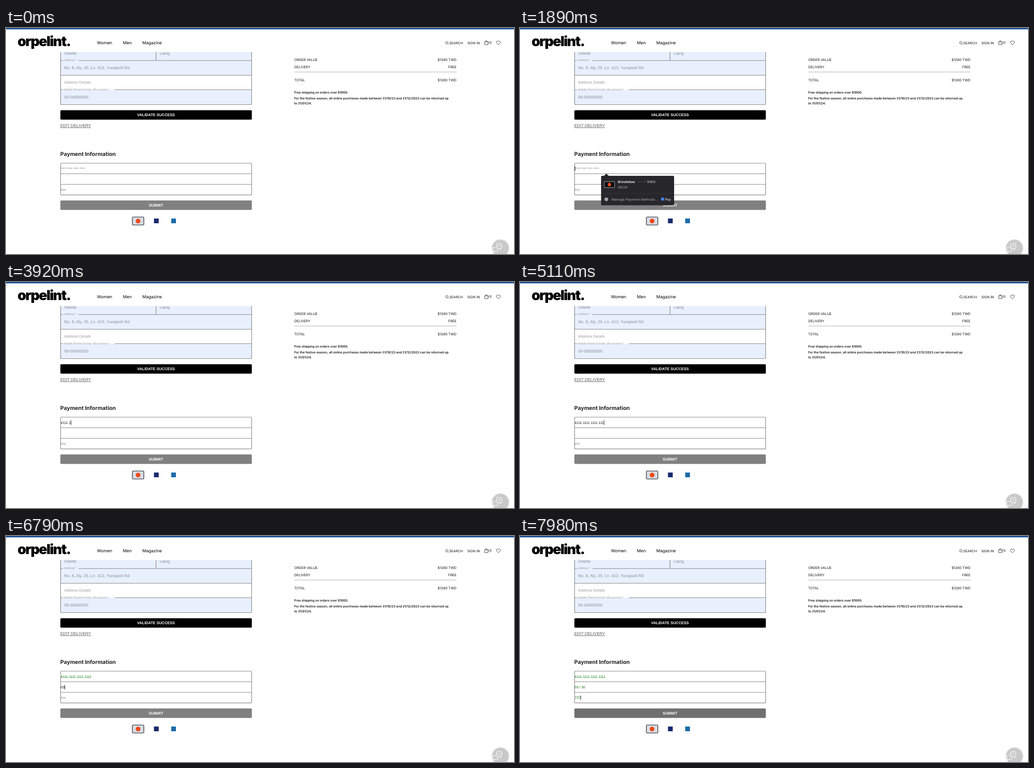
Recreate the animation shown at these times as an HTML page. Size 1121 px wide and 500 px high, loop 8 s.

```html
<!DOCTYPE html>
<html lang="en">
<head>
<meta charset="utf-8">
<title>Checkout</title>
<style>
  html, body { margin: 0; width: 100%; height: 100%; overflow: hidden; background: #fff; }
  svg { display: block; width: 1121px; height: 500px; text-rendering: geometricPrecision; }
  text { font-family: Inter, sans-serif; white-space: pre; }
  .form text, text.form { font-family: "Liberation Sans", Arial, sans-serif; }
  .nav { font-size: 9.4px; }
  .caps { font-size: 7.5px; fill: #111; }
  .note { font-size: 6.85px; font-weight: 600; fill: #111; }
  .value { font-size: 9.07px; fill: #8a8f99; }
  .label { font-size: 6.22px; fill: #9a9a9a; }
  .button { font-size: 8.4px; font-weight: 700; fill: #fff; text-anchor: middle; }
  .entry { font-size: 7.6px; }
  .line { fill: none; stroke: #808080; stroke-width: 1.2; }
  .icon { fill: none; stroke: #111; stroke-width: .8; }
  .end { text-anchor: end; }
</style>
</head>
<body>
<svg viewBox="0 0 1121 500">
  <rect width="1121" height="500" fill="#fff"/>

  <g class="form">
    <rect x="120.5" y="40" width="421.5" height="64.5" fill="#e8f0fe"/>
    <rect x="120.5" y="136.5" width="421.5" height="32.5" fill="#e8f0fe"/>
    <path class="line" d="M120.5 40V167.5q0 2 2 2H540q2 0 2-2V40M331 40V72M120.5 72h5.5M160 72H542M120.5 104.5H542M120.5 136.5h5.5M240 136.5H542"/>
    <text class="value" x="128.5" y="58.7">Odette</text>
    <text class="value" x="339" y="58.7">Liang</text>
    <text class="label" x="128.3" y="73.2">Address *</text>
    <text class="value" x="128.3" y="91.3">No. 8, Aly. 25, Ln. 413, Yunqiaoli Rd</text>
    <text class="value" x="128.3" y="122.8" style="font-size:8.43px;fill:#999">Address Details</text>
    <text class="label" x="128.3" y="138.2">Mobile Phone Format: 09-xxxxxxxx *</text>
    <text class="value" x="128.3" y="156.4">09-00000000</text>

    <rect x="120" y="182" width="422.5" height="20.8" rx="2" fill="#000"/>
    <text class="button" x="331" y="195.2">VALIDATE SUCCESS</text>
    <text x="119.8" y="219.2" font-size="9.1" fill="#555" text-decoration="underline">EDIT DELIVERY</text>

    <rect class="line" x="120.5" y="299" width="421.5" height="70.3" rx="2"/>
    <path class="line" d="M120.5 322.5H542M120.5 346H542"/>
    <g id="fields"></g>
    <rect id="caret" width="1" height="10" fill="#111"/>

    <rect id="submit" x="120" y="381.5" width="422.5" height="21" rx="2" fill="#808080"/>
    <text class="button" x="331" y="395.1">SUBMIT</text>
  </g>
  <text x="119.8" y="283" font-size="12" font-weight="700" fill="#222">Payment Information</text>

  <rect x="278.8" y="418.3" width="25.4" height="17.4" rx="2" fill="#d9dde2" stroke="#4a4f57" stroke-width="1.6"/>
  <circle cx="291.5" cy="427" r="5.2" fill="#ee4a1c"/>
  <rect x="326.5" y="421.5" width="10.5" height="10.5" fill="#1a2a6c"/>
  <rect x="364.5" y="421.5" width="10.5" height="10.5" fill="#1c6ba8"/>

  <g class="caps">
    <text x="636" y="72.6">ORDER VALUE</text>
    <text class="end" x="994" y="72.6">$1280 TWD</text>
    <text x="636" y="89">DELIVERY</text>
    <text class="end" x="994" y="89">FREE</text>
    <text x="636" y="118">TOTAL</text>
    <text class="end" x="994" y="118">$1280 TWD</text>
  </g>
  <path d="M636 97.3H994" stroke="#aaa"/>
  <g class="note">
    <text x="636" y="144.8">Free shipping on orders over $1000.</text>
    <text x="636" y="158.3">For the festive season, all online purchases made between 31/10/23 and 21/12/2023 can be returned up</text>
    <text x="636" y="168.8">to 31/01/24.</text>
  </g>

  <rect width="1121" height="53" fill="#fff"/>
  <rect width="1121" height="3" fill="#1b5296"/>
  <text x="25.5" y="40" font-size="30.5" font-weight="900" letter-spacing="-1.7">orpelint.</text>
  <g class="nav">
    <text x="200.8" y="36">Women</text>
    <text x="258" y="36">Men</text>
    <text x="300.8" y="36">Magazine</text>
  </g>
  <g class="caps">
    <text x="978" y="35.6">SEARCH</text>
    <text x="1018" y="35.6">SIGN IN</text>
    <text x="1064.2" y="35.4" font-size="7">(1)</text>
  </g>
  <g class="icon">
    <circle cx="972.8" cy="32.7" r="2.6"/>
    <path d="M974.7 34.6l2.2 2.2"/>
    <path d="M1056.3 30.6h7.2v6.2h-7.2zM1058 30.6v-.6a1.9 1.9 0 0 1 3.8 0v.6"/>
    <path d="M1086.6 37.2l-3.7-3.9a2.6 2.6 0 0 1 3.7-3.7a2.6 2.6 0 0 1 3.7 3.7z"/>
  </g>

  <circle cx="1091" cy="487" r="20" fill="#e9e9e9"/>
  <circle cx="1091" cy="487" r="18.3" fill="#c9c9c9"/>
  <g fill="none" stroke="#fff" stroke-width="1.2">
    <path d="M1081 485.5h-5.5q-1.5 0-1.5 1.5v6q0 1.5 1.5 1.5h.6v2.2l2.6-2.2h5q1.5 0 1.5-1.5v-3.5"/>
    <path d="M1084.5 477h8q1.5 0 1.5 1.5v8q0 1.5-1.5 1.5h-1v2.2l-2.6-2.2h-4.4q-1.5 0-1.5-1.5v-8q0-1.5 1.5-1.5z"/>
    <path d="M1088.5 484.6l-1.7-1.8a1.2 1.2 0 0 1 1.7-1.7a1.2 1.2 0 0 1 1.7 1.7z" stroke-width=".8"/>
  </g>

  <g id="popup">
    <rect x="178.5" y="328" width="162" height="65.2" rx="2.5" fill="#000" opacity=".15"/>
    <path d="M181 327h4.5l5-5 5 5H337.500q2.500 0 2.500 2.500V389.500q0 2.500-2.500 2.500H181.500q-2.500 0-2.500-2.500V329.500q0-2.500 2.500-2.500z" fill="#27272b"/>
    <rect x="186" y="340" width="22.800" height="13" rx="1" fill="#0b0b0b" stroke="#c9c9c9" stroke-width=".9"/>
    <circle cx="197.300" cy="346.500" r="3.700" fill="#ee4a1c"/>
    <text x="216" y="343.100" font-size="7.400" font-weight="600" fill="#f1f1f1">Brindellow</text>
    <g id="dots" fill="#aaa"></g>
    <text x="280.300" y="343.100" font-size="7.500" fill="#c0c0c3">9968</text>
    <text x="216" y="355" font-size="7.300" fill="#a8a8ac">09/29</text>
    <path d="M179 366H340" stroke="#3b3b40" stroke-width=".8"/>
    <circle cx="190.500" cy="379" r="4" fill="#a5a5aa"/>
    <text x="202" y="381.900" font-size="7.600" fill="#a8a8ac">Manage Payment Methods...</text>
    <circle cx="314.600" cy="378.500" r="3.600" fill="#4285f4"/>
    <text x="320" y="381.600" font-size="7.600" fill="#f4f4f4">Pay</text>
  </g>
</svg>
<script>
const LOOP = 8000, BLINK = 490;
const GREEN = [0, 112, 0], BLACK = [17, 17, 17], GREY = [117, 117, 117];
const svgNS = "http://www.w3.org/2000/svg";
const byId = id => document.getElementById(id);
const clamp = v => Math.max(0, Math.min(1, v));
const mix = (a, b, k) => `rgb(${a.map((v, i) => Math.round(v + (b[i] - v) * k))})`;

function add(parent, tag, attrs) {
  const el = document.createElementNS(svgNS, tag);
  for (const key in attrs) el.setAttribute(key, attrs[key]);
  return parent.appendChild(el);
}

for (let i = 0; i < 4; i++) add(byId("dots"), "circle", { cx: 262.8 + i * 4.5, cy: 340.6, r: .75 });

// Each key is [time, characters shown]; valid is when the entry starts to turn green.
const fields = [
  { hint: "**** **** **** ****", full: "4111 1111 1111 1111", focus: 1750, valid: 5390, y: 313.5,
    keys: [[3150, 1], [3500, 2], [3640, 3], [3780, 5], [3920, 6], [4060, 7], [4270, 8], [4410, 10], [4550, 11],
           [4620, 12], [4760, 13], [4830, 15], [4970, 16], [5110, 18], [5390, 19]] },
  { hint: "", full: "03 / 30", focus: 5390, valid: 7210, y: 337,
    keys: [[6720, 1], [6790, 2], [6860, 5], [7070, 6], [7210, 7]] },
  { hint: "ccv", full: "737", focus: 7210, valid: 7910, y: 360.4,
    keys: [[7630, 1], [7770, 2], [7910, 3]] }
];
for (const f of fields) f.el = add(byId("fields"), "text", { class: "entry", x: 120.8, y: f.y });

function popupAlpha(t) {
  if (t < 1820 || t >= 3430) return 0;
  return t < 1890 || t >= 3360 ? .5 : 1;
}

function draw(t) {
  let active = null, touched = 0;
  for (const f of fields) {
    const past = f.keys.filter(k => k[0] <= t);
    const last = past[past.length - 1];
    f.el.textContent = last ? f.full.slice(0, last[1]) : f.hint;
    f.el.setAttribute("fill", last ? mix(BLACK, GREEN, clamp((t - f.valid) / 70)) : mix(GREY, GREY, 0));
    if (t >= f.focus) {
      active = f;
      touched = last ? last[0] : f.focus === 1750 ? 1820 : f.focus;
      f.end = last ? f.el.getComputedTextLength() : 0;
    }
  }
  const caret = byId("caret");
  const on = active && Math.floor(Math.max(0, t - touched) / BLINK) % 2 === 0;
  caret.style.display = on ? "" : "none";
  if (on) {
    caret.setAttribute("x", 120.8 + active.end);
    caret.setAttribute("y", active.y - 7.5);
  }
  byId("popup").style.opacity = popupAlpha(t);
  byId("submit").setAttribute("fill", mix([128, 128, 128], [0, 0, 0], clamp((t - 7910) / 560)));
}

const start = performance.now();
function tick() {
  draw((performance.now() - start) % LOOP);
  requestAnimationFrame(tick);
}
tick();
</script>
</body>
</html>
```
